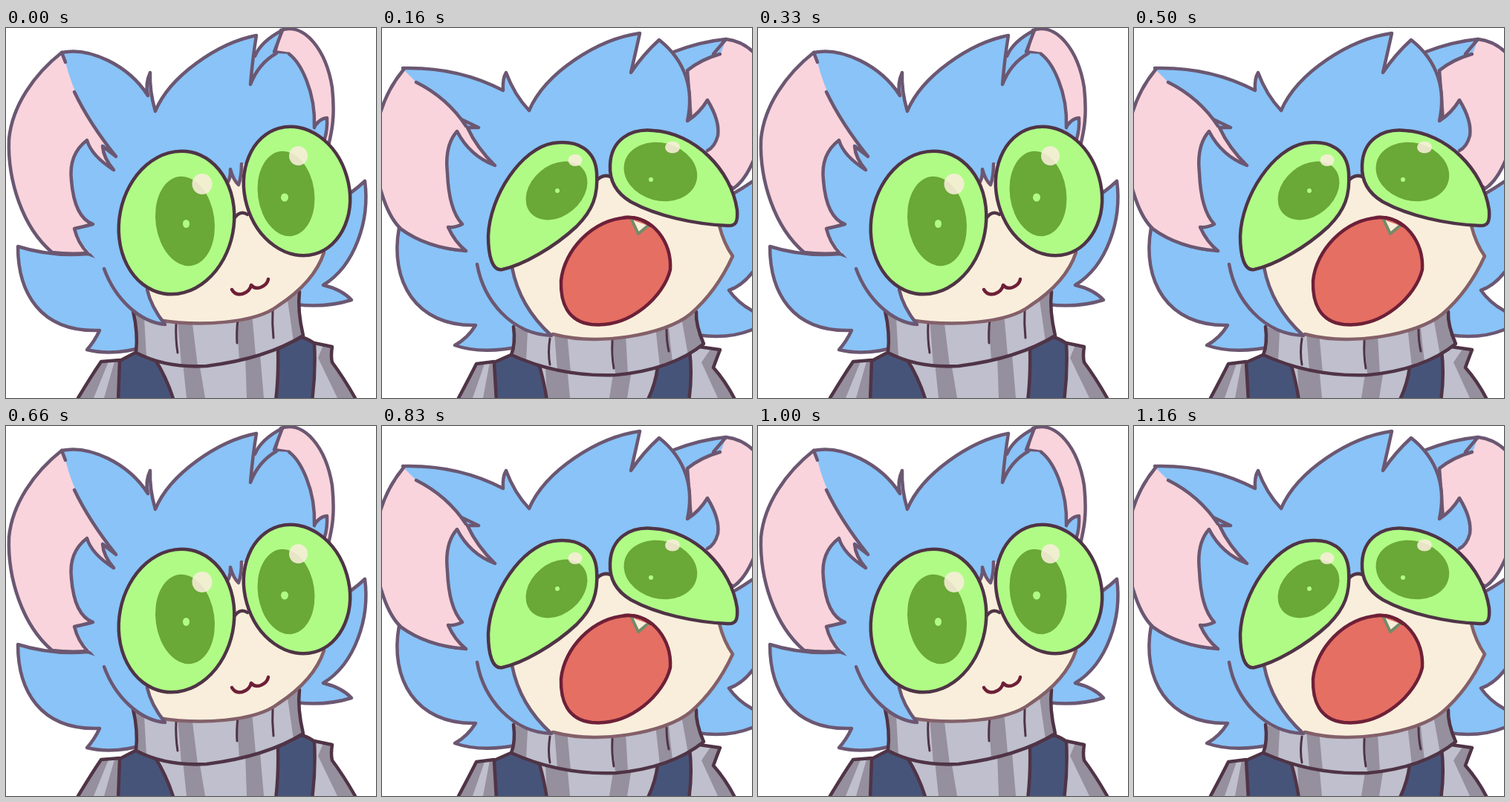
Write an HTML page that moves like this. It is 498 px wide and 498 px high and loops after 1.33 s.

```html
<!DOCTYPE html>
<html lang="en">
<head>
<meta charset="utf-8">
<title>Shouting mouse</title>
<style>
html, body { margin: 0; width: 100%; height: 100%; overflow: hidden; background: #fff; }
svg { display: block; width: 498px; height: 498px; }
path, ellipse { fill: none; stroke-linejoin: round; stroke-linecap: round; }
.hair { fill: #89c3f7; }
.pink { fill: #f9d4dc; }
.skin { fill: #f9eedb; }
.wool { fill: #bfbfcd; }
.rib { fill: #968f9d; }
.vest { fill: #47547a; }
.lens { fill: #b0fb86; }
.iris { fill: #6aa837; }
.glint { fill: #f9eedb; opacity: .87; }
.line { stroke: #6b5772; stroke-width: 4.5; }
.chin { stroke: #836069; stroke-width: 4.5; }
.dark { stroke: #4f3446; stroke-width: 4.5; }
.seam { stroke: #4f3446; stroke-width: 3; }
.lip { stroke: #6d2038; stroke-width: 4.5; }
.maw { fill: #e56f62; }
.tooth { fill: #f9eedb; stroke: #728b68; stroke-width: 4; }
#shout { visibility: hidden; }
</style>
</head>
<body>
<svg viewBox="0 0 498 498">
<g id="calm">
  <!-- right ear, cheek tufts, head -->
  <path class="pink line" d="M370 3C402-8 431 30 439 80C443 118 439 138 434 158L390 160L360 40Z"/>
  <path class="hair" d="M335 38Q343 18 372 3L361 32L381 35L350 70L329 76Z"/>
  <path class="line" d="M335 38Q343 18 372 3L361 32L381 35"/>
  <path class="hair line" d="M413 137Q420 122 432 121Q433 138 428 152L410 165Z"/>
  <path class="hair line" d="M400 250Q447 240 483 206C490 258 470 320 427 346Q452 352 465 366Q430 377 390 372Z"/>
  <path class="hair line" d="M110 304Q60 308 16 294C16 355 45 410 126 407Q119 422 109 433Q145 442 190 428L240 350Z"/>
  <path class="hair" d="M75 33C112 25 165 50 191 91Q187 75 194 60Q193 85 201 112C220 65 285 20 337 10Q332 40 329 76C337 55 350 42 364 34L381 35C396 46 417 85 415 134L430 230L400 330L214 399L120 310L65 250Z"/>
  <path class="line" d="M75 33C112 25 165 50 191 91Q187 75 194 60Q193 85 201 112C220 65 285 20 337 10Q332 40 329 76C337 55 350 42 364 34M381 35C396 46 417 85 415 134"/>
  <!-- left ear -->
  <path class="pink" d="M75 33L80 46Q94 102 134 155L130 159L138 187Q115 168 109 151Q84 175 87 205Q91 250 117 264Q102 268 92 270L110 303L62 302C22 268 2 205 4 150C8 105 38 62 75 33"/>
  <path class="line" d="M62 302C22 268 2 205 4 150C8 105 38 62 75 33L80 46M92 86Q112 128 148 173L130 159Q131 175 145 191Q115 172 109 151Q84 170 88 205Q92 255 117 264Q102 268 92 270Q97 290 110 303Q85 305 62 302"/>
  <!-- body -->
  <path class="wool" d="M97 498Q115 468 128 449L152 447L175 436L400 420L439 429L439 450Q454 470 470 498Z"/>
  <path class="rib" d="M97 498Q115 468 128 449H138L118 498ZM146 449H156L152 498H132ZM238 450H260L268 498H243ZM322 440H342L347 498H324ZM427 427L439 429L439 450Q454 470 470 498H446L420 444Z"/>
  <path class="vest dark" d="M153 448L176 436L200 445Q217 472 226 502H151ZM366 432L398 416Q410 420 415 425Q417 462 412 502H363Q367 470 366 432Z"/>
  <path class="dark" d="M97 498Q115 468 128 449L153 447M415 424L439 429Q437 442 439 450Q454 470 470 498"/>
  <!-- collar -->
  <path class="wool" d="M171 381Q178 410 175 437Q215 458 270 455Q350 445 400 414Q392 380 395 355L300 370Z"/>
  <path class="rib" d="M171 381L186 390L189 443L175 437ZM231 390H250L258 455L236 454ZM310 388L331 384L336 440L314 447ZM379 366L395 355Q392 380 400 414L387 422Z"/>
  <path class="dark" d="M171 381Q178 410 175 437Q215 458 270 455Q350 445 400 414Q392 380 395 355"/>
  <path class="seam" d="M229 398Q228 418 231 437M312 392Q310 410 311 424M359 378Q358 398 360 417"/>
  <!-- face -->
  <path class="skin" d="M205 393C260 402 335 398 366 374Q415 342 428 300L330 183L317 183Q317 200 313 211Q306 205 302 190Q303 205 294 214L280 300L190 350Z"/>
  <path class="chin" d="M205 393C260 402 335 398 366 374Q415 342 428 302"/>
  <path class="line" d="M293 213Q303 207 302 190Q306 205 313 211Q317 200 317 183"/>
  <path class="hair" d="M132 323C147 365 180 396 214 399Q195 375 190 346Z"/>
  <path class="line" d="M132 324C147 365 180 396 214 399Q195 375 190 352"/>
  <path class="dark" d="M308 255Q316 245 325 251"/>
  <ellipse class="lens dark" cx="229.500" cy="262" rx="77" ry="97" transform="rotate(11 229.500 262)"/>
  <ellipse class="lens dark" cx="391.500" cy="219.500" rx="70" ry="88" transform="rotate(-16 391.500 219.500)"/>
  <ellipse class="iris" cx="241" cy="260" rx="39.500" ry="60.500" transform="rotate(-8 241 260)"/>
  <ellipse class="iris" cx="377" cy="223" rx="38" ry="57.500" transform="rotate(-8 377 223)"/>
  <ellipse class="lens" cx="242.500" cy="263.500" rx="4.500" ry="5.500"/>
  <ellipse class="lens" cx="375" cy="228" rx="5" ry="5.500"/>
  <ellipse class="glint" cx="264" cy="210" rx="13.500" ry="14"/>
  <ellipse class="glint" cx="393.500" cy="172" rx="12.500" ry="13"/>
  <path class="lip" d="M304 352Q308 360 318 358Q328 355 330 346Q335 352 343 349Q352 345 353 338"/>
</g>
<g id="shout">
  <!-- right ear, cheek tufts, head -->
  <path class="pink line" d="M463 15Q488 18 505 38V165Q492 203 473 216L420 180L411 57Z"/>
  <path class="hair" d="M393 32Q430 18 463 15L457 32L411 57L390 60Z"/>
  <path class="line" d="M393 32Q430 18 463 15L446 35M411 57Q430 42 455 35"/>
  <path class="hair line" d="M440 240Q478 222 505 202V320Q488 346 467 353Q480 372 505 384V403Q470 420 424 413L400 360Z"/>
  <path class="hair line" d="M113 300Q60 296 23 269C10 340 45 402 126 400Q115 418 98 427Q135 440 190 428L240 350Z"/>
  <path class="hair" d="M28 54Q102 52 163 84Q162 68 167 60Q178 90 198 111C220 60 290 15 347 7Q342 30 335 60Q352 35 373 16C410 45 420 85 411 125Q427 115 438 97Q455 125 452 145Q448 160 438 165L440 260L228 414L108 312L80 260Z"/>
  <path class="line" d="M28 54Q102 52 163 84Q162 68 167 60Q178 90 198 111C220 60 290 15 347 7Q342 30 335 60Q352 35 373 16C410 45 420 85 411 125Q427 115 438 97Q455 125 452 145Q448 160 438 165"/>
  <!-- left ear -->
  <path class="pink" d="M29 56L47 74Q82 95 107 124L116 135Q130 162 152 185Q118 175 101 138Q85 158 87 195Q90 245 107 264L89 268L113 300Q60 296 25 270C4 250-10 200-10 160C-8 120 5 85 29 56"/>
  <path class="line" d="M113 300Q60 296 25 270C4 250-10 200-10 160C-8 120 5 85 29 56M46 73Q88 94 113 132M107 123L130 134L115 134Q128 162 152 185Q118 172 101 139Q84 158 88 195Q90 245 108 264Q98 269 89 268Q98 288 113 300"/>
  <!-- body -->
  <path class="wool" d="M103 498Q118 470 127 452L151 449L178 438L425 428L455 433L446 457Q462 475 474 498Z"/>
  <path class="rib" d="M103 498Q118 470 127 452H138L122 498ZM145 450H156L154 498H136ZM220 455H249L253 498H222ZM312 460H336L330 498H306ZM443 431L455 433L446 457Q462 475 474 498H452L430 450Z"/>
  <path class="vest dark" d="M151 450L178 438L212 455Q219 480 222 502H154ZM371 456L414 434Q418 468 413 502H357Q368 480 371 456Z"/>
  <path class="dark" d="M103 498Q118 470 127 452L151 449M427 429L455 433Q450 446 446 457Q462 475 474 498"/>
  <!-- collar -->
  <path class="wool" d="M177 402Q180 425 174 440Q240 470 315 467Q390 460 433 425Q422 400 423 382L300 390Z"/>
  <path class="rib" d="M177 402L196 409L194 448L174 440ZM232 410H249L254 464L236 461ZM310 416L328 414L331 466L314 467ZM368 402L385 396L391 450L374 456ZM403 390L423 382Q422 400 433 425L412 440Z"/>
  <path class="dark" d="M177 402Q180 425 174 440Q240 470 315 467Q390 460 433 425Q422 400 423 382"/>
  <path class="seam" d="M226 418Q223 437 226 453M310 421Q309 440 312 458M383 406Q383 422 386 435"/>
  <!-- face -->
  <path class="skin" d="M228 412C290 428 380 414 415 385Q450 355 472 307Q460 290 453 262L313 203Q300 192 290 207L175 322Q185 375 228 412Z"/>
  <path class="chin" d="M230 412C290 428 380 414 415 385Q450 355 472 307Q460 290 454 266"/>
  <path class="hair" d="M128 318C137 368 175 412 228 414Q185 375 175 322Z"/>
  <path class="line" d="M128 318C137 368 175 412 228 414Q185 375 175 322"/>
  <path class="dark" d="M289 205Q300 194 313 203"/>
  <path class="lens dark" d="M289 195C287 165 265 150 230 155C188 162 145 225 143 280C143 305 148 328 162 325C190 319 232 295 262 267C284 245 291 225 289 195Z"/>
  <path class="lens dark" d="M307 185C308 150 335 135 365 138C420 141 470 190 478 245C479 260 477 267 465 266C420 264 370 253 335 234C315 222 306 205 307 185Z"/>
  <ellipse class="iris" cx="235" cy="219" rx="46" ry="34" transform="rotate(-40 235 219)"/>
  <ellipse class="iris" cx="375" cy="193.500" rx="50" ry="39" transform="rotate(15 375 193)"/>
  <ellipse class="lens" cx="236" cy="219" rx="3" ry="3"/>
  <ellipse class="lens" cx="362" cy="204" rx="3" ry="3"/>
  <ellipse class="glint" cx="260" cy="178" rx="9.500" ry="8"/>
  <ellipse class="glint" cx="391" cy="160.500" rx="10" ry="8"/>
  <path class="maw lip" d="M330 255C364 253 390 288 388 325C380 360 335 404 282 399C250 395 240 370 241 340C245 300 282 258 330 255Z"/>
  <path class="tooth" d="M336 258L345 277L358 266"/>
  <path class="lip" d="M326 255Q345 253 362 266"/>
</g>
</svg>
<script>
const LOOP = 1330;
const CUTS = [160, 330, 500, 660, 830, 1000, 1160];
const calm = document.getElementById("calm");
const shout = document.getElementById("shout");
const start = performance.now();

function draw(now) {
  const t = Math.max(0, now - start) % LOOP;
  const open = CUTS.filter(cut => cut <= t).length % 2 === 1;
  calm.style.visibility = open ? "hidden" : "visible";
  shout.style.visibility = open ? "visible" : "hidden";
  requestAnimationFrame(draw);
}
requestAnimationFrame(draw);
</script>
</body>
</html>
```
